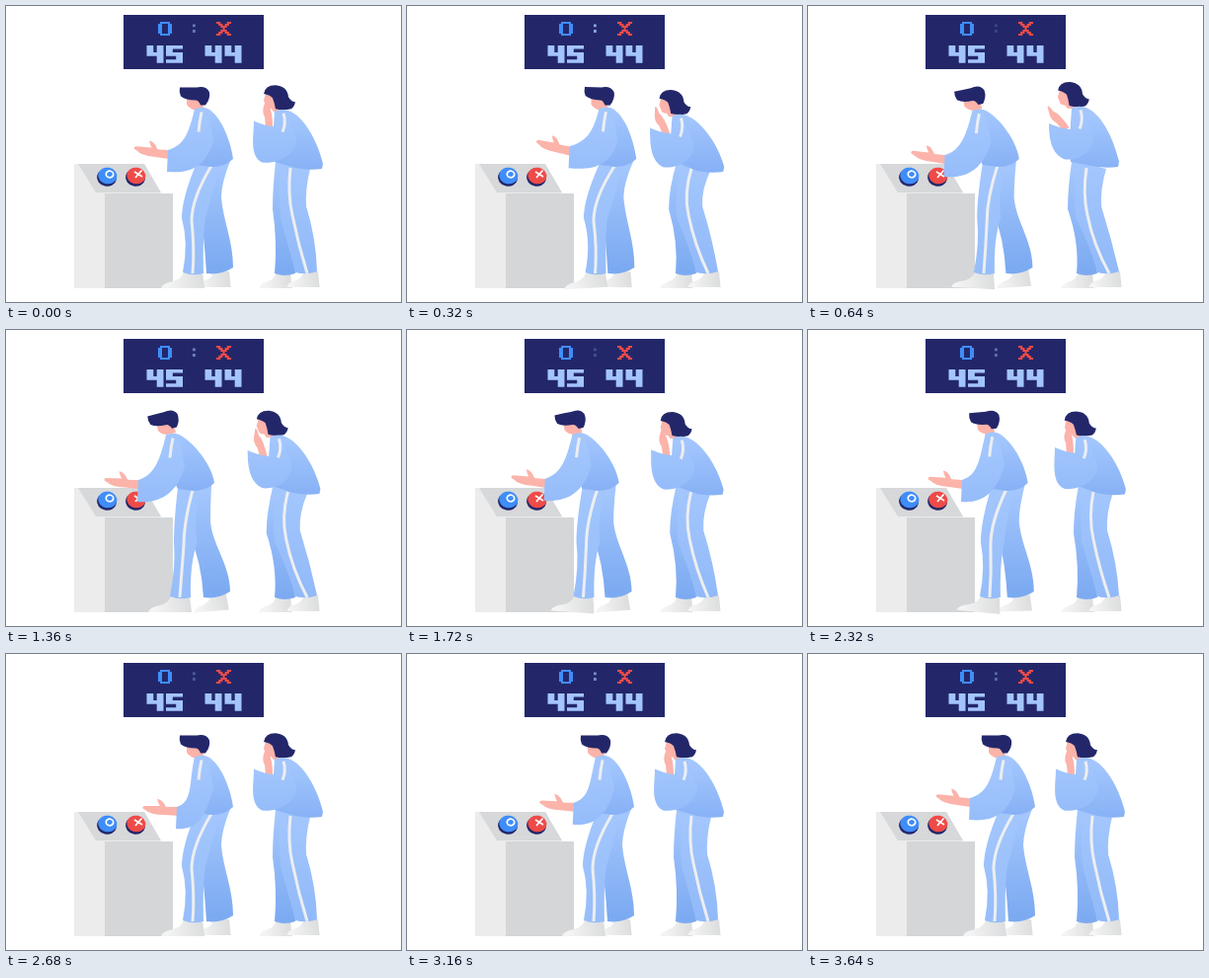
Animation of 400 by 300 pixels, one loop 3680 ms. Source, as an HTML page with a canvas:

```html
<!DOCTYPE html>
<html lang="en">
<head>
<meta charset="utf-8">
<title>Quiz duel</title>
<style>
html, body { margin: 0; width: 100%; height: 100%; overflow: hidden; background: #fff; }
canvas { display: block; }
</style>
</head>
<body>
<canvas id="stage" width="400" height="300"></canvas>
<script>
const ctx = document.getElementById('stage').getContext('2d');
const LOOP = 3680, STEP = 40;
const NAVY = '#23276a', SKIN = '#fbb3aa', STRIPE = '#eceef0', PALE = '#a4c5fc';
const BLUE = '#3f8df8', RED = '#ee4b48';

// time, lean over the buttons, reach of the arm, turn of the hand
const manKeys = [
  [0, 0, 0, 5], [320, -0.12, -3, 10], [640, 0.85, 0, 6],
  [1360, 1, 0, 2], [2040, 0.65, 0, 7], [2680, 0, 9, 0]
];
// time, shift backwards, dip of the shoulders, turn of the hand
const womanKeys = [
  [0, 1, 0.4, 0], [320, 0.3, 1, -18], [640, 0, 0, -35],
  [1360, 0.1, 0.6, -12], [2040, 0.75, 0.9, 2], [2680, 1, 0.4, 0]
];

// Eases between neighbouring keys; the last one leads back to the first
function poseAt(keys, t) {
  const i = keys.findLastIndex(key => key[0] <= t);
  const from = keys[i], to = keys[(i + 1) % keys.length];
  const end = to[0] || LOOP;
  const k = (1 - Math.cos(Math.PI * (t - from[0]) / (end - from[0]))) / 2;
  return from.map((v, j) => v + (to[j] - v) * k).slice(1);
}

function gradient(x0, y0, x1, y1, a, b) {
  const g = ctx.createLinearGradient(x0, y0, x1, y1);
  g.addColorStop(0, a);
  g.addColorStop(1, b);
  return g;
}

const cloth = (y0, y1, dark = '#86b0f5') => gradient(0, y0, 0, y1, '#a3c6fd', dark);

function fill(d, color) {
  ctx.fillStyle = color;
  ctx.fill(new Path2D(d));
}

function line(d, color, width) {
  ctx.strokeStyle = color;
  ctx.lineWidth = width;
  ctx.stroke(new Path2D(d));
}

function at(x, y, degrees, draw, scaleX = 1) {
  ctx.save();
  ctx.translate(x, y);
  ctx.rotate(degrees * Math.PI / 180);
  ctx.scale(scaleX, 1);
  draw();
  ctx.restore();
}

function ellipse(x, y, rx, ry) {
  ctx.beginPath();
  ctx.ellipse(x, y, rx, ry, 0.2, 0, 7);
}

function pixels(x, y, w, h, color, rows) {
  ctx.beginPath();
  rows.split('/').forEach((row, j) => [...row].forEach((c, i) => {
    if (c === '#') ctx.rect(x + i * w, y + j * h, w, h);
  }));
  ctx.fillStyle = color;
  ctx.fill();
}

function scoreboard(t) {
  const four = '##.##/##.##/#####/...##/...##', five = '#####/##.../#####/...##/#####';
  ctx.fillStyle = NAVY;
  ctx.fillRect(119, 9, 142, 55);
  pixels(154, 16, 2, 2, BLUE, '.#####./##...##/##...##/##...##/##...##/##...##/.#####.');
  pixels(213, 16, 2.15, 2, RED, '##...##/.##.##./..###../...#.../..###../.##.##./##...##');
  [142.5, 201.5, 221.5].forEach(x => pixels(x, 40, 3.4, 3.55, PALE, four));
  pixels(162, 40, 3.4, 3.55, PALE, five);
  ctx.globalAlpha = 0.52 + 0.35 * Math.sin(2 * Math.PI * t / 920);
  pixels(189, 18.5, 2.8, 2.8, PALE, '#/./#');
  ctx.globalAlpha = 1;
}

function button(x, color) {
  ellipse(x, 174, 10, 8.8);
  ctx.fillStyle = NAVY;
  ctx.fill();
  ellipse(x + 0.8, 172, 9.6, 8.3);
  ctx.fillStyle = color;
  ctx.fill();
}

function podium() {
  fill('M69 160H140L157 190H169V286H69Z', '#ececec');
  fill('M73 160H140L157 189H91Z', '#d7d8da');
  fill('M100 190H169V286H100Z', '#d4d6d8');
  button(102, BLUE);
  button(131, RED);
  ellipse(105, 170.5, 3.7, 3.3);
  ctx.strokeStyle = '#fff';
  ctx.lineWidth = 1.7;
  ctx.stroke();
  line('M130 168L138 173M137.5 166.5L131 174', '#fff', 1.7);
}

function shoe(x, y, tilt, scale) {
  at(x, y, tilt, () => fill('M1 -1H20L22 15H-22Q-21 10 -10 8Q-2 6 1 -1Z',
    gradient(-16, 10, 20, 4, '#f4f4f4', '#dcddde')), scale);
}

function man(t) {
  const [lean, reach, turn] = poseAt(manKeys, t);
  const cx = 197 - 29 * lean, cy = 104.5 + 2 * lean, hem = 230 - 19 * lean;
  const cuffX = 163 - 30 * lean + reach, cuffY = 157 + 6 * lean + reach;
  const knee = 178 - 8 * lean, ankle = 179 - 13 * lean;
  const back = 218 - 11 * lean, heel = 230 - 3 * lean;

  shoe(heel - 20, 270, -5 * lean, 0.8);
  shoe(ankle, 271, 24 * lean * (1 - lean), 1);
  fill(`M${hem - 30} 160L${hem - 3} 157Q${back} 180 ${back} 194
    C${back + 2} 218 ${heel} 238 ${heel} 265Q${heel - 12} 273 ${heel - 27} 271
    Q${heel - 29} 235 ${back - 22} 205Z`, cloth(165, 265, '#7caaf1'));
  fill(`M${hem - 37} 159Q${knee} 195 ${knee} 215Q${ankle + 6} 240 ${ankle} 270
    Q${ankle + 10} 274 ${ankle + 21} 271Q${ankle + 20} 235 ${knee + 24} 215
    Q${hem - 22} 195 ${hem - 14} 160Z`, cloth(160, 290, '#94bcf9'));
  line(`M${hem - 22} 162Q${knee + 10} 195 ${knee + 10} 218Q${ankle + 12} 245 ${ankle + 10} 271`, STRIPE, 3);

  at(191 - 31 * lean, 91.5 + lean, -14 * lean, () => {
    fill('M-8 1L8 0L9 14H0Q-6 12 -8 8Z', SKIN);
    fill('M-15 -9Q-6 -9 2 -9Q12 -11 15 -4Q16 3 11 9L6 9Q4 4 1 4Q-9 4 -14 0Q-16 -4 -15 -9Z', NAVY);
  });
  fill(`M${cx - 6} ${cy}Q${cx} ${cy - 3} ${cx + 6} ${cy - 1}
    C${cx + 20} ${cy + 5} ${hem - 3} 135 ${hem} 155Q${hem - 8} 163 ${hem - 22} 163
    L${hem - 37} 161L${cx - 7} ${cy + 30}Z`, cloth(108, 165));
  at(cuffX, cuffY - 7, turn, () => fill(
    'M4 -4L-10 -4Q-14 -12 -19 -12Q-18 -8 -16 -5L-32 -5Q-36 -3 -31 -1Q-26 4 -12 4L4 5Z', SKIN));
  fill(`M${cx - 6} ${cy}C${cx - 12} ${cy + 24} ${cuffX + 18} ${cuffY - 16} ${cuffX + 1} ${cuffY - 11}
    L${cuffX} ${cuffY + 11}C${cuffX + 22} ${cuffY + 13} ${cx + 5} ${cy + 60} ${cx + 13} ${cy + 32}
    L${cx + 8} ${cy + 6}Z`, cloth(118, 182, '#93bbf9'));
  line(`M${cx + 1} ${cy + 3}Q${cx - 1} ${cy + 12} ${cx - 2} ${cy + 23}`, STRIPE, 3);
}

function woman(t) {
  const [shift, dip, turn] = poseAt(womanKeys, t);
  const cx = 273 + 5 * shift, cy = 103.5 + 8 * dip, hem = 315 + 4 * shift + 5 * dip;
  const cuffX = 255 + 7 * shift, cuffY = 122 + 6 * dip - 5 * shift;
  const knee = 263 + 7 * shift, low = 162 + 5 * dip;

  shoe(273, 271, 0, 0.75);
  shoe(301, 270, 0, 0.75);
  fill(`M${hem - 48} 158Q${knee} 185 ${knee} 206Q275 240 272 271Q282 275 293 271
    Q290 235 ${knee + 24} 205L${hem - 20} 162Z`, cloth(165, 270, '#7caaf1'));
  fill(`M${hem - 44} 158L${hem - 13} 165Q${knee + 33} 185 ${knee + 34} 203
    Q${knee + 44} 235 315 269Q305 273 293 270Q285 240 ${knee + 8} 215
    Q${knee + 6} 185 ${hem - 44} 158Z`, cloth(165, 290, '#8eb7f8'));
  line(`M${hem - 33} 164Q${knee + 15} 190 ${knee + 20} 212Q${knee + 26} 242 305 271`, STRIPE, 3);

  at(268 + 8 * shift, 89 + 8 * dip, 2 - 4 * dip * shift, () => {
    fill('M-13 -4L-4 -4L3 15H-5L-7 12Q-13 12 -13 8L-15 4Z', SKIN);
    fill(`M-15 -3Q-14 -12 -3 -12Q9 -11 10 0Q13 5 17 5Q16 10 13 12Q4 14 -3 12
      Q-4 6 -6 1Q-9 -2 -15 -3Z`, NAVY);
  });
  fill(`M${cx - 6} ${cy}Q${cx} ${cy - 3} ${cx + 7} ${cy - 1}
    C${cx + 22} ${cy + 3} ${hem - 6} ${cy + 28} ${hem} ${low - 4}L${hem - 1} ${low + 1}
    Q${hem - 14} ${low + 3} ${hem - 28} ${low}L${hem - 49} 158L${cx - 8} ${cy + 30}Z`, cloth(112, 170));
  at(cuffX + 4, cuffY, turn, () => fill(
    'M-3 4L-4 -7Q-7 -12 -5 -18L-2 -26Q0 -27 0 -19Q4 -13 4 4Z', SKIN));
  fill(`M${cuffX - 11} ${cuffY - 3}C${cuffX - 11} ${cuffY + 12} 246 ${cy + 46} 260 ${cy + 52}
    C276 ${cy + 53} ${cx + 16} ${cy + 44} ${cx + 16} ${cy + 28}
    L${cx + 6} ${cy + 4}L${cx - 4} ${cy + 2}L${cuffX + 11} ${cuffY + 3}
    Q${cuffX} ${cuffY + 2} ${cuffX - 11} ${cuffY - 3}Z`, cloth(112, 168, '#93bbf9'));
  line(`M${cx + 3} ${cy + 2}Q${cx + 6} ${cy + 12} ${cx + 2} ${cy + 21}`, STRIPE, 3);
}

function frame(now) {
  const t = Math.floor(now / STEP) * STEP % LOOP;
  ctx.fillStyle = '#fff';
  ctx.fillRect(0, 0, 400, 300);
  scoreboard(t);
  podium();
  woman(t);
  man(t);
  requestAnimationFrame(frame);
}
requestAnimationFrame(frame);
</script>
</body>
</html>
```
